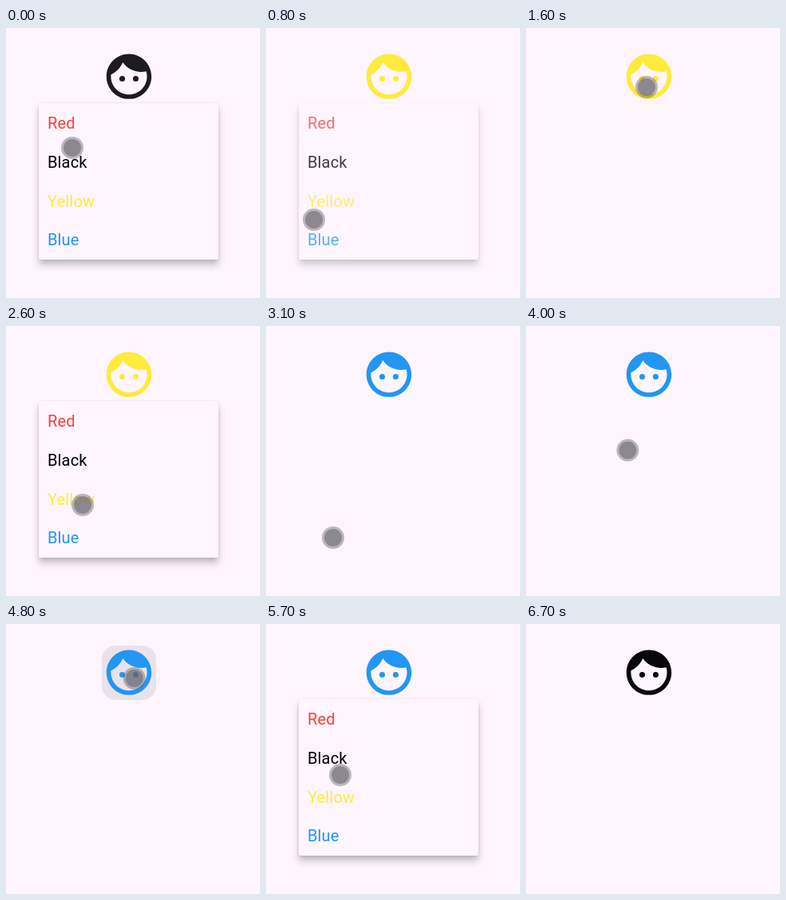
Write an HTML page that moves like this. It is 318 by 338 pixels and loops after 7.7 s.

```html
<!DOCTYPE html>
<html lang="en">
<head>
<meta charset="utf-8">
<style>
  html, body { margin: 0; width: 100%; height: 100%; overflow: hidden; background: #fef5ff; }
  svg, #menu { position: absolute; left: 0; top: 0; }
  #menu {
    left: 41px; top: 94px; width: 225px; height: 195.5px; border-radius: 2px;
    background: #fef5ff;
    box-shadow: 0 0 2px rgba(0,0,0,.12), 0 5px 6px -2px rgba(0,0,0,.15), 0 7px 10px 1px rgba(0,0,0,.15);
    font: 20px/51px Roboto, sans-serif; letter-spacing: .2px;
  }
  #menu div { height: 48.8px; padding-left: 10.9px; }
</style>
</head>
<body>
<svg width="318" height="338">
  <rect id="glow" x="120" y="27" width="68" height="68" rx="17" fill="#000" fill-opacity=".08"/>
  <g id="face" transform="translate(120.1 26.8) scale(2.82)">
    <circle cx="9" cy="13" r="1.25"/>
    <circle cx="15" cy="13" r="1.25"/>
    <path fill-rule="evenodd" d="M12 2C6.48 2 2 6.48 2 12s4.48 10 10 10 10-4.48 10-10S17.52 2 12 2z
      m0 18c-4.41 0-8-3.59-8-8 0-.29.02-.58.05-.86 2.36-1.05 4.23-2.98 5.21-5.37C11.07 8.33 14.05 10 17.42 10
      c.78 0 1.53-.09 2.25-.26.21.71.33 1.47.33 2.26 0 4.41-3.59 8-8 8z"/>
  </g>
</svg>
<div id="menu">
  <div style="color:#f44336">Red</div>
  <div style="color:#000">Black</div>
  <div style="color:#ffeb3b">Yellow</div>
  <div style="color:#2196f3">Blue</div>
</div>
<svg width="318" height="338">
  <g id="pointer">
    <circle r="14" fill="rgba(90,85,95,.4)"/>
    <circle r="11" fill="rgba(100,98,105,.55)"/>
  </g>
</svg>
<script>
const LOOP = 7700, STEP = 100, FADE = 200;
const [glow, face, menu, pointer] =
  ['glow', 'face', 'menu', 'pointer'].map(id => document.getElementById(id));

// Each visit opens the menu, then picks a colour
const visits = [
  { open: -1000, pick: 750, color: '#ffeb3b' },
  { open: 1800, pick: 2900, color: '#2196f3' },
  { open: 4850, pick: 6100, color: '#070608' }
];

// Pointer stops: time, x, y
const stops = [
  [0, 83, 150], [700, 60, 240], [1300, 60, 240],
  [1600, 151, 74], [2100, 158, 68], [2600, 96, 224], [2900, 84, 265], [3500, 84, 265],
  [4400, 162, 68], [5300, 159, 68], [5700, 93, 189], [6200, 60, 178], [6650, 284, -15]
];

const ramp = (t, start, span) => Math.min(1, Math.max(0, (t - start) / span));
const total = f => visits.reduce((sum, v) => sum + f(v), 0);

function place(t) {
  let [, x, y] = stops[0];
  for (let i = 1; i < stops.length; i++) {
    const [t0, x0, y0] = stops[i - 1], [t1, x1, y1] = stops[i];
    const p = ramp(t, t0, t1 - t0);
    x += (x1 - x0) * p;
    y += (y1 - y0) * p;
  }
  return `translate(${x} ${y})`;
}

function draw(now) {
  const t = Math.floor(now % LOOP / STEP) * STEP;
  const picked = visits.filter(v => v.pick < t).pop();
  menu.style.opacity = total(v => ramp(t, v.open, FADE) - ramp(t, v.pick, FADE));
  glow.style.opacity = total(v => ramp(t, v.open - 150, 100) - ramp(t, v.open + 300, FADE));
  face.style.fill = picked ? picked.color : '#1d1b20';
  pointer.setAttribute('transform', place(t));
  requestAnimationFrame(draw);
}
draw(0);
</script>
</body>
</html>
```
